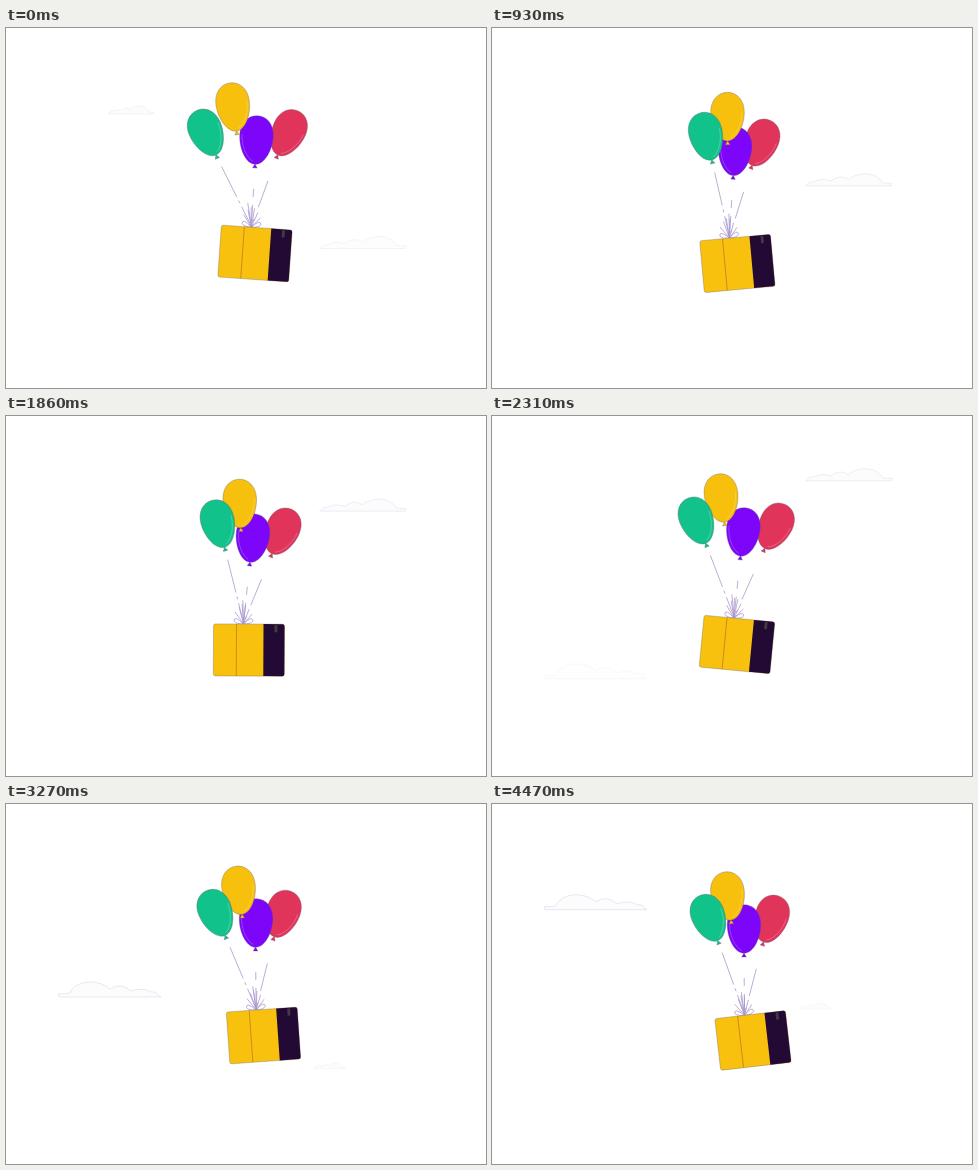
Write an HTML page that moves like this. It is 480 px wide and 360 px high and loops after 4500 ms.

```html
<!DOCTYPE html>
<html lang="en">
<head>
<meta charset="utf-8">
<title>Balloon delivery</title>
<style>
  html, body { margin: 0; width: 100%; height: 100%; overflow: hidden; background: #fff; }
  svg { display: block; width: 100vw; height: 100vh; }
  .cloud { fill: #fcfcfd; stroke: #e4e0f0; stroke-width: .8; }
  .cloud path { vector-effect: non-scaling-stroke; }
  .string { stroke: #b3a5d2; stroke-width: .9; fill: none; }
  .bow { stroke: #a996cf; stroke-width: .75; fill: none; }
  .edge { stroke: #655c70; stroke-opacity: .55; stroke-width: .6; }
  .shine { fill: none; stroke: #fff; stroke-opacity: .3; stroke-width: .7; }
</style>
</head>
<body>
<svg viewBox="0 0 480 360">
  <defs>
    <path id="puff" d="M2 0L1 -3Q10 -3 13 -4C17 -15 38 -20 53 -8Q64 -15 74 -6Q86 -10 94 -5Q101 -5 101 -2L104 0Z"/>
    <g id="balloon">
      <path class="edge" d="M0 24L-2.3 28H2.3Z"/>
      <path class="edge" d="M0 24.3C-9.5 24.3 -16.8 9 -16.8 -4.5C-16.8 -16.5 -9.5 -24.3 0 -24.3S16.8 -16.5 16.8 -4.5C16.8 9 9.5 24.3 0 24.3Z"/>
    </g>
    <path id="shine" d="M14.5 -5C14.5 8 8 19 2 21.5"/>
  </defs>
  <g id="clouds"></g>
  <g id="strings"></g>
  <g id="balloons"></g>
  <g id="box">
    <g class="bow">
      <path d="M-5.5 -26L-14 -38M-5.5 -26L-10 -43M-5.5 -26L-7 -46M-5.5 -26L-3.5 -45M-5.5 -26L0 -41M-5.5 -26L3 -36"/>
      <path d="M-5.5 -26Q-15 -35 -15 -29Q-13 -26 -5.5 -26Q3 -35 4 -29Q2 -26 -5.5 -26"/>
    </g>
    <rect x="-35.5" y="-26" width="71" height="52" rx="2" fill="#f8c10d" class="edge"/>
    <path d="M14.5 -26H33.5Q35.5 -26 35.5 -24V24Q35.5 26 33.5 26H14.5Z" fill="#230a34"/>
    <path d="M-12.5 -26V26" stroke="#cf8420" stroke-width=".9"/>
    <rect x="25.5" y="-25" width="2.8" height="7" fill="#403c40"/>
  </g>
</svg>
<script>
const LOOP = 4500, STEP = 30, PERIOD = 2650;
const times = [0, 510, 1380, 2310, 2650, 3270, 3780, 4050, 4470];

// Each pose is x, y, tilt in degrees.
const boxPoses = [[249, 225.5, 4], [247.5, 231, -1.5], [243.5, 238, -6.5], [245, 228.5, 5.5], [249.5, 225.5, 3.5],
  [257.5, 231.5, -4], [265, 238, -13], [265, 241, -12.5], [261, 236.5, -6.5]];

const balloons = [
  { color: '#e0345a', dash: '0 25 28 12 3 4 12 200', flip: 1,
    poses: [[282, 105, 25], [273.5, 110, 22], [268, 118, 22], [283, 110.5, 25], [283, 106, 24],
      [276.5, 110, 20], [270.5, 115, 13], [273, 118, 14], [279, 115, 18]] },
  { color: '#7d05fa', dash: '0 22 8 8 60 200', flip: -1,
    poses: [[250.3, 112, 3], [245.7, 118, 3], [242, 126.5, 5], [251, 116, 6], [251.5, 113, 4],
      [250, 119, 1], [249, 127.5, -1], [250.5, 129.5, -1], [252, 125, 0]] },
  { color: '#f7c00d', dash: '0 70 50', flip: 1,
    poses: [[227.2, 79, -8], [232, 84, -4], [237.3, 91.5, 2], [229.5, 82, -7], [227.5, 79.3, -8],
      [233, 86.3, -7], [238.5, 93.5, -6], [239, 95, -6], [236, 92, -7]] },
  { color: '#12c28b', dash: '0 10 34 4 3 4 30', flip: 1,
    poses: [[200.5, 104.7, -23], [208, 106, -18], [218, 110, -10], [205, 104.7, -21], [202, 103, -23],
      [210, 109, -22], [220, 115, -20], [220.5, 117, -20], [217, 114, -21]] }
];

// y is the base line at time 0; fade holds [time, opacity] stops.
const clouds = [
  { x: 148, y: 86, v: .061, sx: -.44, sy: .55, fade: [[0, 1], [510, .2], [540, 0]] },
  { x: 401, y: 220.5, v: .0674, sx: -.84, sy: .8, fade: [[0, .6], [400, 1], [2350, .9], [2650, 0]] },
  { x: 51, y: 430.7, v: .0727, sx: 1, sy: 1, fade: [[2220, 0], [2310, .3], [3100, 1]] },
  { x: 339.5, y: 427.2, v: .0497, sx: -.31, sy: .4, fade: [[3140, 0], [3270, 1]] }
];

const $ = id => document.getElementById(id);
function add(parent, tag, attrs) {
  const el = document.createElementNS('http://www.w3.org/2000/svg', tag);
  for (const k in attrs) el.setAttribute(k, attrs[k]);
  return parent.appendChild(el);
}

for (const c of clouds) {
  c.el = add($('clouds'), 'g', { class: 'cloud' });
  add(c.el, 'use', { href: '#puff' });
}
for (const b of balloons) {
  b.string = add($('strings'), 'line', { class: 'string', 'stroke-dasharray': b.dash });
  b.el = add($('balloons'), 'g', { fill: b.color });
  add(b.el, 'use', { href: '#balloon' });
  add(b.el, 'use', { href: '#shine', class: 'shine', transform: `scale(${b.flip} 1)` });
}

// Extend the first swing backwards so that it starts smoothly.
const knots = [times[3] - PERIOD, ...times];
const extend = poses => [poses[3], ...poses];
boxPoses.unshift(boxPoses[3]);
for (const b of balloons) b.poses = extend(b.poses);

function spline(poses, axis, t) {
  const last = knots.length - 1;
  let i = 0;
  while (i < last - 1 && t >= knots[i + 1]) i++;
  const slope = k => (poses[k + 1][axis] - poses[k][axis]) / (knots[k + 1] - knots[k]);
  const tangent = k => {
    if (k === 0) return slope(0);
    if (k === last) return slope(last - 1);
    const h0 = knots[k] - knots[k - 1], h1 = knots[k + 1] - knots[k];
    return (slope(k - 1) * h1 + slope(k) * h0) / (h0 + h1);
  };
  const h = knots[i + 1] - knots[i], u = (t - knots[i]) / h, w = 1 - u;
  return poses[i][axis] * w * w * (1 + 2 * u) + tangent(i) * h * u * w * w
    + poses[i + 1][axis] * u * u * (3 - 2 * u) - tangent(i + 1) * h * u * u * w;
}

function ramp(stops, t) {
  if (t <= stops[0][0]) return stops[0][1];
  for (let i = 1; i < stops.length; i++) {
    const [t0, a] = stops[i - 1], [t1, b] = stops[i];
    if (t < t1) return a + (b - a) * (t - t0) / (t1 - t0);
  }
  return stops[stops.length - 1][1];
}

const poseAt = (poses, t) => [0, 1, 2].map(axis => spline(poses, axis, t));

function place(el, [x, y, tilt]) {
  el.setAttribute('transform', `translate(${x} ${y}) rotate(${tilt})`);
}

function local([x, y, tilt], px, py) {
  const a = tilt * Math.PI / 180, c = Math.cos(a), s = Math.sin(a);
  return [x + px * c - py * s, y + px * s + py * c];
}

function draw(t) {
  const box = poseAt(boxPoses, t);
  place($('box'), box);
  const [tx, ty] = local(box, -5.5, -27);
  for (const b of balloons) {
    const pose = poseAt(b.poses, t), [kx, ky] = local(pose, 0, 27);
    place(b.el, pose);
    const ends = { x1: kx, y1: ky, x2: tx, y2: ty };
    for (const k in ends) b.string.setAttribute(k, ends[k]);
  }
  for (const c of clouds) {
    c.el.setAttribute('transform', `translate(${c.x} ${c.y - c.v * t}) scale(${c.sx} ${c.sy})`);
    c.el.setAttribute('opacity', ramp(c.fade, t));
  }
}

const start = performance.now();
function tick() {
  const t = (performance.now() - start) % LOOP;
  draw(Math.floor(t / STEP) * STEP);
  requestAnimationFrame(tick);
}
tick();
</script>
</body>
</html>
```
